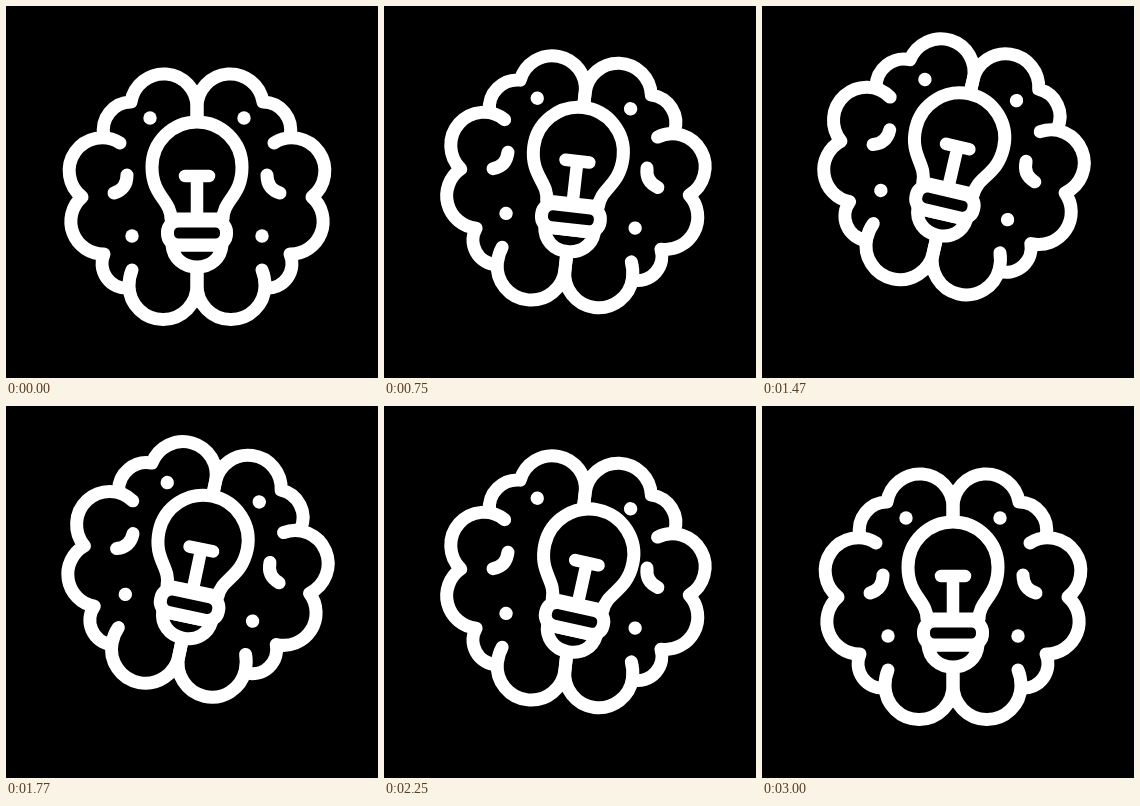
Animation, 372 px wide and 372 px high, one loop 3030 ms. Source, as an HTML page:

```html
<!DOCTYPE html>
<html lang="en">
<head>
<meta charset="utf-8">
<title>Idea brain</title>
<style>
  html, body { margin: 0; width: 100%; height: 100%; overflow: hidden; background: #000; }
  svg { display: block; width: 100%; height: 100%; }
  .line { fill: none; stroke: #fff; stroke-width: 13; stroke-linecap: round; stroke-linejoin: round; }
  .dot { fill: #fff; stroke: none; }
  .solid { fill: #000; }
</style>
</head>
<body>
<svg viewBox="0 0 372 372">
  <defs>
    <g id="half" class="line">
      <path d="M191 113V101A33.2 33.2 0 0 0 125 96A28 28 0 0 0 98 130"/>
      <path d="M114 137A33.05 33.05 0 0 0 76 191A32.5 32.5 0 0 0 98 248A24.500 24.500 0 0 0 122 282"/>
      <path d="M126 264Q123 271 123 280A34 34 0 0 0 191 279V262"/>
      <path d="M121 169Q121 183 108 187"/>
      <circle class="dot" cx="144" cy="112" r="6.7"/>
      <circle class="dot" cx="126" cy="230" r="6.7"/>
    </g>
  </defs>
  <g id="brain">
    <use href="#half"/>
    <use href="#half" transform="matrix(-1 0 0 1 382 0)"/>
    <g id="bulb" class="line">
      <path class="solid" d="M166 239C167 252 177 261 191 261S215 252 216 239Z"/>
      <path class="solid" d="M165 213C165 194 146 190 146 161A45 45 0 0 1 236 161C236 190 217 194 217 213Z"/>
      <path d="M179 170H203M191 170V213" stroke-width="12.5"/>
      <rect class="solid" x="161.5" y="215" width="59" height="24" rx="11"/>
    </g>
  </g>
</svg>
<script>
  const LOOP = 3030, STEP = 30, HALF = 1500;
  const NOD_TIMES = [300, 2250], NOD_REACH = 300, NOD_ANGLE = 6;
  const brain = document.getElementById('brain');
  const bulb = document.getElementById('bulb');

  const ease = x => {
    const u = Math.min(1, Math.max(0, x));
    return u * u * (3 - 2 * u);
  };
  // Rises to 1 at the peak and falls back to 0 on either side.
  const pulse = (t, peak, reach) => ease(1 - Math.abs(t - peak) / reach);

  function draw(t) {
    const lift = pulse(t, HALF, HALF);
    const nod = NOD_TIMES.reduce((sum, peak) => sum + pulse(t, peak, NOD_REACH), 0);
    brain.setAttribute('transform', `translate(0 ${-30 * lift}) rotate(${13 * lift} 191 191)`);
    bulb.setAttribute('transform', `rotate(${NOD_ANGLE * nod} 191 262)`);
  }

  const start = performance.now();
  function tick() {
    const t = (performance.now() - start) % LOOP;
    draw(Math.floor(t / STEP) * STEP);
    requestAnimationFrame(tick);
  }
  draw(0);
  requestAnimationFrame(tick);
</script>
</body>
</html>
```
